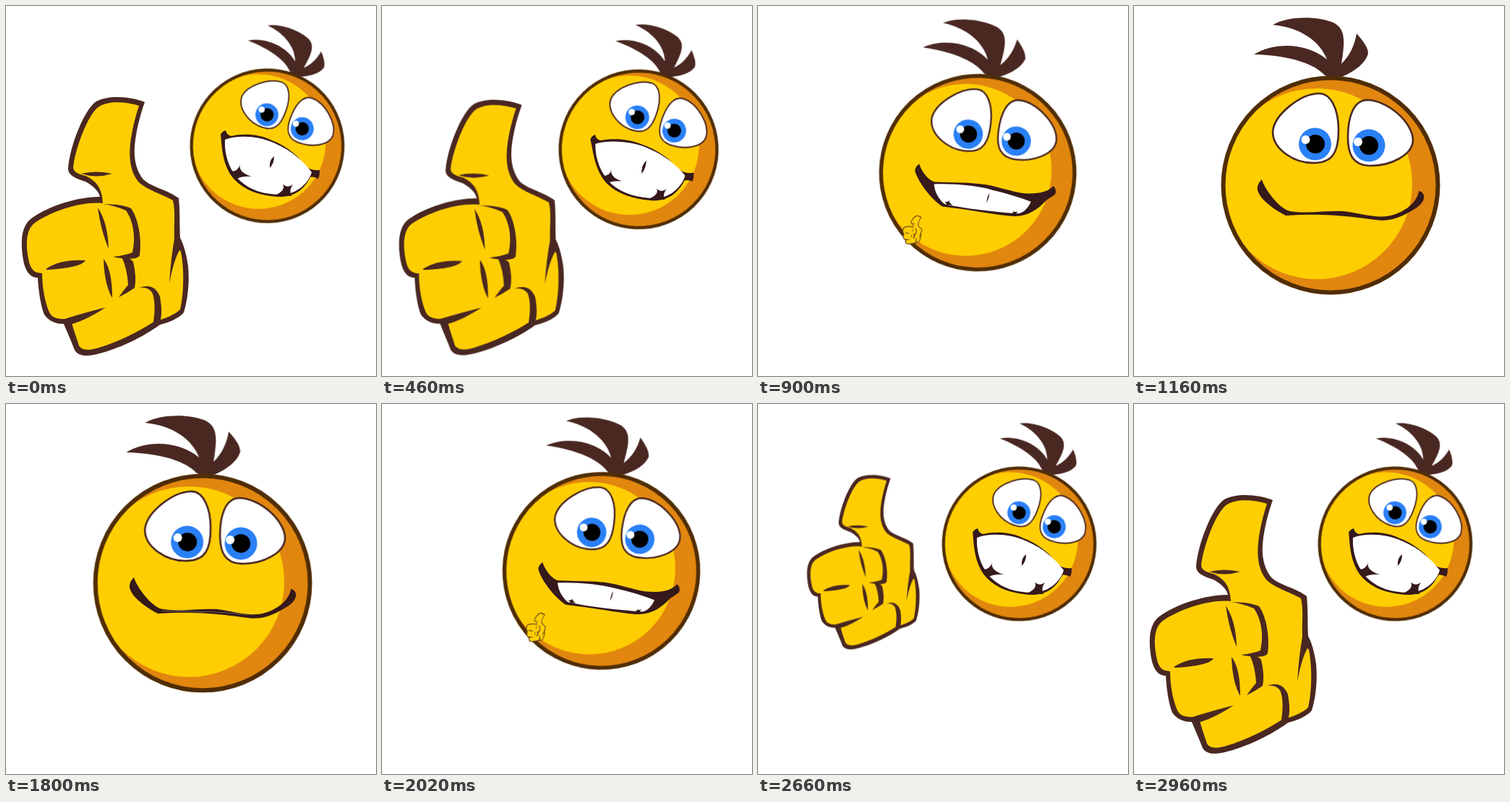
An HTML page without scripts for the animation above (3 s loop, 512 by 512 pixels).

```html
<!DOCTYPE html>
<html lang="en">
<head>
<meta charset="utf-8">
<title>Thumbs up</title>
<style>
html, body { margin: 0; width: 100%; height: 100%; overflow: hidden; background: #fff; }
svg { display: block; width: 100%; height: 100%; }

.dark { fill: #4a2822; }
.yellow { fill: #ffce02; }
.orange { fill: #e1860e; }
.white { fill: #fff; }
.rim { fill: none; stroke: #502d05; stroke-width: 6; }
.eye { fill: #fff; stroke: #4a2822; stroke-width: 2.6; }
.iris { fill: #2a80f6; }

/* Each face part supplies three poses: grin, half and calm. */
.face {
  --grin: translate(89.5px, -54.5px) rotate(20deg) scale(.706);
  --half: translate(62px, -33.5px) rotate(13deg) scale(.81);
  --calm: translate(0, 0) rotate(0deg) scale(1);
  transform-origin: 272px 248px;
  animation: pose 3s linear infinite;
}
.morph { animation: morph 3s linear infinite; }
.lip {
  fill: #35191b;
  --grin: path("M304 172C305 176 307 179 312 180C328 176 350 177 368 186C382 191 394 200 404 209C412 219 418 229 434 227C434 231 434 235 432 239C428 237 424 236 421 237C412 255 398 265 376 264C350 262 330 255 316 240C298 220 299 192 297 178C298 175 301 173 304 172Z");
  --half: path("M266 198C267 203 268 206 272 206C296 204 321 208 340 213C357 218 370 223 381 229C393 236 406 248 422 243C423 247 423 251 421 255C417 254 413 254 410 257C400 274 388 286 366 286C340 285 315 278 297 266C278 248 270 222 260 207C260 203 263 200 266 198Z");
  --calm: path("M177 240C180 252 200 280 216 284C240 288 265 283 290 284C315 287 330 293 350 291C375 287 393 270 394 256C400 257 402 262 401 266C400 272 395 277 388 281C372 291 355 299 335 296C310 293 270 286 210 290C190 280 168 262 171 250C172 245 174 243 177 240Z");
}
.teeth {
  --grin: path("M303 185C322 178 350 180 372 190C395 200 412 215 423 230C420 242 405 261 380 261C358 261 338 255 324 242C308 226 302 205 303 185Z");
  --half: path("M270 209C300 207 342 212 366 224C384 232 398 241 408 250C403 263 390 281 372 282C345 282 315 275 298 262C284 250 272 232 270 209Z");
  --calm: path("M215 287C237.5 287 258.8 287 280 287.75C301.3 288.5 322.5 290 345 293C345 293 345 293 345 293C300 287 260 287 215 287C215 287 215 287 215 287Z");
}
.cracks {
  fill: #35191b;
  --grin: path("M371 208Q364 213 365 224Q371 218 371 208ZM310 229Q322 229 324 219Q321 230 340 236Q326 235 318 240ZM372 262Q388 255 383 246Q389 253 397 247Q391 255 395 263Z");
  --half: path("M349 233Q341 245 341 259Q347 247 349 233ZM285 255Q296 257 296 249Q295 258 306 264Q297 263 291 263ZM357 284Q371 281 370 275Q375 278 382 275Q377 280 380 284Z");
  --calm: path("M290 286Q290 286 290 287Q290 287 290 286ZM230 288Q230 288 230 288Q230 288 230 288Q230 288 230 288ZM335 294Q335 294 335 294Q335 294 335 294Q335 294 335 294Z");
}
.hand { transform-origin: 150px 308px; animation: thumb 3s linear infinite; }

@keyframes pose {
  0%, 13.33%, 79.33%, 100% { transform: var(--grin); }
  22%, 74.5% { transform: var(--half); }
  22% { animation-timing-function: cubic-bezier(.4, .2, .7, .8); }
  38.67%, 60% { transform: var(--calm); }
}
@keyframes morph {
  0%, 13.33%, 79.33%, 100% { d: var(--grin); }
  22%, 74.5% { d: var(--half); }
  22% { animation-timing-function: cubic-bezier(.4, .2, .7, .8); }
  38.67%, 60% { d: var(--calm); }
}
@keyframes thumb {
  0%, 13.33% { transform: translate(0, 0) rotate(0deg) scale(1); animation-timing-function: ease-in; }
  22% { transform: translate(7px, 20.5px) rotate(5.6deg) scale(.867); }
  31.3%, 64.7% { transform: translate(75px, 0) rotate(18deg) scale(0); }
  74% { transform: translate(40.5px, 7.5px) rotate(11.5deg) scale(.413); }
  77.3% { transform: translate(38px, 37px) rotate(9deg) scale(.57); animation-timing-function: ease-in-out; }
  88.67% { transform: translate(4.5px, -87.5px) rotate(.3deg) scale(.672); }
  94% { transform: translate(4px, -6px) rotate(0deg) scale(1.2); }
  95.33% { transform: translate(7px, -3px) rotate(0deg) scale(1.156); }
  98.67%, 100% { transform: translate(0, 0) rotate(0deg) scale(1); }
}
</style>
</head>
<body>
<svg viewBox="0 0 512 512">
  <clipPath id="ball"><circle cx="272" cy="248" r="148"/></clipPath>

  <g class="face">
    <path class="dark" d="M166 67C195 49 240 51 267 74C258 50 232 30 192 26C215 13 255 14 276 23C293 32 292 48 287 80C299 68 305 55 308 38C316 47 324 57 324 66C320 80 305 90 290 97C285 99 270 99 264 96C250 80 215 68 166 67Z"/>
    <circle class="orange" cx="272" cy="248" r="148"/>
    <circle class="yellow" cx="253" cy="246" r="132" clip-path="url(#ball)"/>
    <circle class="rim" cx="272" cy="248" r="148.5"/>
    <path class="eye" d="M255 121C272 120 283 142 283 172C283 200 276 216 252 217C222 219 192 198 192 174C194 150 230 122 255 121Z"/>
    <path class="eye" d="M322 130C350 130 385 160 386 185C386 206 355 222 325 221C303 220 296 205 296 182C296 155 303 131 322 130Z"/>
    <circle class="iris" cx="250.5" cy="191" r="22.5"/>
    <circle cx="251" cy="191" r="13"/>
    <circle class="white" cx="237.5" cy="185" r="6"/>
    <circle class="iris" cx="325" cy="193" r="22.5"/>
    <circle cx="325" cy="193" r="13"/>
    <circle class="white" cx="310" cy="188" r="6"/>
  </g>

  <path class="morph lip"/>
  <path class="morph teeth white"/>
  <path class="morph cracks"/>

  <g class="hand">
    <path class="dark" d="M192 133C175 126 144 122 125 132C108 143 88 195 86 225C86 235 98 239 110 243C122 250 128 256 130 264C100 264 60 276 35 294C20 305 20 330 24 352C27 368 34 376 44 376C45 395 48 415 53 427C60 437 70 440 80 440C85 452 92 468 95 476C100 485 112 485 125 482C155 475 190 458 213 441C225 438 240 432 246 424C252 405 254 380 252 360C250 345 246 330 241 321C240 305 241 285 239 266C225 255 200 250 190 240C178 225 176 205 179 185C182 165 186 150 192 133Z"/>
    <path class="yellow" d="M184 138C165 132 142 131 129 139C113 149 95 200 93 224C94 231 103 233 110 235C125 242 133 252 134 273C105 270 65 283 40 300C26 310 27 335 33 358C37 368 42 369 50 370C50 390 54 410 60 424C64 432 72 434 90 433C92 445 98 460 101 470C106 478 118 476 128 473C155 465 185 450 206 436C220 433 234 427 241 420C246 400 247 365 242 340C238 335 234 330 233 322C232 305 235 285 231 269C215 260 192 253 183 243C170 226 170 205 173 183C176 165 180 150 184 138Z"/>
    <g class="dark">
      <path d="M104 232Q125 227 147 232Q125 239 104 232Z"/>
      <path d="M127 279Q141 300 142 336Q131 310 127 279Z"/>
      <path d="M134 274Q160 274 173 280C184 295 188 325 185 345C182 351 165 351 148 347Q165 345 175 341C180 320 176 297 166 283Q150 276 134 274Z"/>
      <path d="M55 364Q75 350 110 352Q105 362 57 365Z"/>
      <path d="M135 350Q147 365 147 404Q136 385 135 350Z"/>
      <path d="M160 347Q172 348 176 354Q181 375 178 390Q168 397 156 403Q162 394 169 386Q168 364 160 347Z"/>
      <path d="M78 434Q110 424 138 417Q112 434 92 440Z"/>
      <path d="M184 390Q205 382 213 402Q218 430 211 440L204 437Q208 410 202 396Q195 388 184 390Z"/>
      <path d="M240 322Q248 340 240 338Q232 352 226 384Q228 350 233 322Z"/>
    </g>
  </g>
</svg>
</body>
</html>
```
